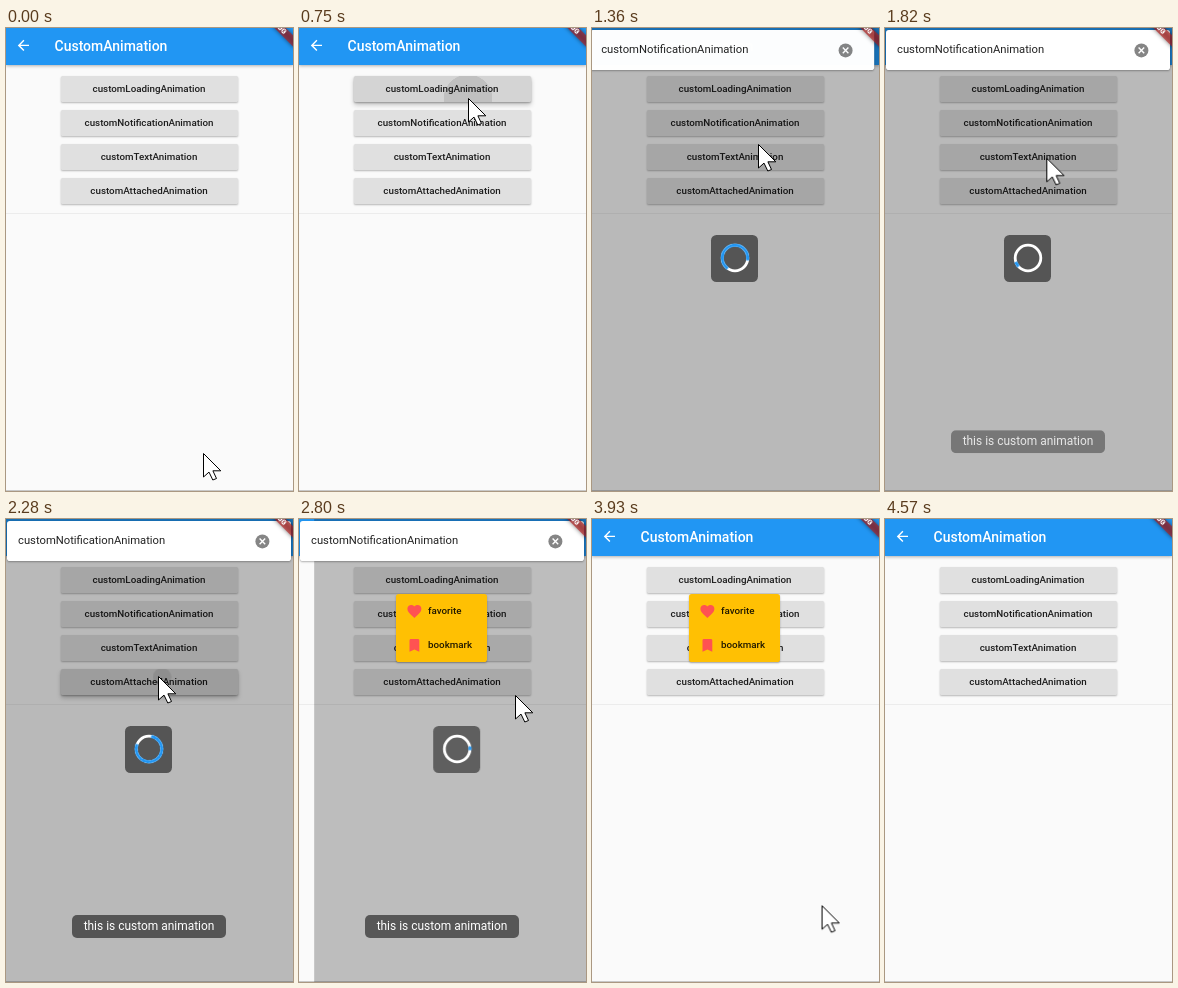
An HTML page that plays this animation: 287x463 px, repeating every 4.98 s.

```html
<!DOCTYPE html>
<html lang="en">
<head>
<meta charset="utf-8">
<title>CustomAnimation</title>
<style>
  :root { --loop: 4980ms; }
  html, body { margin: 0; width: 100%; height: 100%; overflow: hidden; }
  body { background: #fafafa; }
  #stage {
    position: relative; width: 287px; height: 463px; overflow: hidden;
    background: #fafafa; color: rgba(0, 0, 0, .87);
    font: 500 9.8px Roboto, sans-serif; white-space: nowrap;
  }
  #stage div, #stage svg, i { position: absolute; }
  svg { overflow: visible; }

  .bar {
    left: 0; top: 0; width: 287px; height: 37px; background: #2196f3;
    box-shadow: 0 1px 3px rgba(0, 0, 0, .3);
  }
  .title { left: 48.5px; top: 0; color: #fff; font-size: 14px; line-height: 36px; }
  .line { left: 0; width: 287px; height: 1px; }

  /* Buttons: highlight plus clipped splash */
  .btn {
    left: 54.5px; width: 177px; height: 26px; border-radius: 1.5px;
    background: #e0e0e0; text-align: center; line-height: 25px;
    box-shadow: 0 1px 2px rgba(0, 0, 0, .28);
  }
  .btn::before, .btn i { content: ""; position: absolute; inset: 0; border-radius: 1.5px; }
  .btn::before {
    opacity: 0; background: rgba(0, 0, 0, .05);
    box-shadow: 0 3px 5px rgba(0, 0, 0, .22);
    animation: press var(--loop) var(--at) infinite;
  }
  .btn i { overflow: hidden; }
  .btn i::after {
    content: ""; position: absolute; left: calc(var(--x) - 25px); top: calc(var(--y) - 25px);
    width: 50px; height: 50px; border-radius: 50%; opacity: 0;
    background: rgba(0, 0, 0, .09);
    animation: splash var(--loop) var(--at) linear infinite;
  }
  .btn span { position: relative; }
  @keyframes press {
    0% { opacity: 0; }
    .4%, 2.71% { opacity: 1; }
    6.7%, 100% { opacity: 0; }
  }
  @keyframes splash {
    0% { opacity: 1; transform: scale(.2); }
    2.71% { opacity: 1; transform: scale(1); }
    6.7%, 100% { opacity: 0; transform: scale(5); }
  }

  /* Toasts decelerate in, hold, and play back in reverse */
  .toast { opacity: 0; animation: show var(--loop) var(--at) infinite; }
  @keyframes show {
    0% {
      opacity: 0; transform: translate(var(--dx, 0), var(--dy, 0));
      animation-timing-function: cubic-bezier(.333, .667, .667, 1);
    }
    4.1% { opacity: 1; transform: none; }
    39.76% {
      opacity: 1; transform: none;
      animation-timing-function: cubic-bezier(.333, 0, .667, .333);
    }
    43.86%, 100% { opacity: 0; transform: translate(var(--dx, 0), var(--dy, 0)); }
  }

  .loading { --at: 774ms; --dx: 287px; inset: 0; background: rgba(0, 0, 0, .26); }
  .card {
    left: 119px; top: 207px; width: 47px; height: 46.5px;
    border-radius: 5.5px; background: rgba(0, 0, 0, .54);
  }
  .ring { left: 23.5px; top: 23.25px; width: 1px; height: 1px; }
  .ring circle { fill: none; stroke: #fff; stroke-width: 2.8; }
  .ring .arc {
    stroke: #2196f3; stroke-width: 3; stroke-linecap: square; stroke-dasharray: 0 360;
    animation: spin var(--loop) 760ms linear infinite,
               arc var(--loop) 760ms cubic-bezier(.4, 0, .2, 1) infinite;
  }
  @keyframes spin {
    from { transform: rotate(-90deg); }
    to { transform: rotate(1433.9deg); }
  }
  @keyframes arc {
    0% { stroke-dasharray: 0 360; stroke-dashoffset: 0; }
    10.04% { stroke-dasharray: 270 90; stroke-dashoffset: 0; }
    20.08% { stroke-dasharray: 0 360; stroke-dashoffset: -270; }
    30.12% { stroke-dasharray: 270 90; stroke-dashoffset: -270; }
    40.16% { stroke-dasharray: 0 360; stroke-dashoffset: -540; }
    50.2%, 100% { stroke-dasharray: 270 90; stroke-dashoffset: -540; }
  }

  .note {
    --at: 1177ms; --dx: -287px; left: 1px; top: 2px; width: 284px; height: 40px;
    border-radius: 2.8px; background: #fff; box-shadow: 0 1px 2px rgba(0, 0, 0, .3);
    font-weight: 400; font-size: 11.25px; line-height: 40px; text-indent: 11px;
  }
  .text {
    --at: 1735ms; --dy: 18.4px; left: 66px; top: 396px; width: 154px; height: 23px;
    border-radius: 5px; background: rgba(0, 0, 0, .54); color: #fff;
    font-weight: 400; font-size: 11.95px; line-height: 22px; text-align: center;
  }
  .menu {
    --at: 2310ms; left: 97px; top: 75px; width: 91px; height: 68px;
    border-radius: 2.8px; background: #ffc003; box-shadow: 0 1px 2px rgba(0, 0, 0, .3);
  }
  .menu svg { left: 9.5px; }
  .menu div { left: 32px; line-height: 14px; }

  .banner {
    left: 242.7px; top: -6.6px; width: 56px; height: 8.4px; transform: rotate(45deg);
    color: #fff; font-size: 7.1px; font-weight: 900; line-height: 8.4px; text-align: center;
  }
  .banner::before, .banner::after { content: ""; position: absolute; inset: 0; }
  .banner::before { background: rgba(0, 0, 0, .5); filter: blur(2px); }
  .banner::after { background: rgba(183, 28, 28, .63); }
  .banner span { position: relative; z-index: 1; }

  .cursor { left: 0; top: 0; width: 20px; height: 28px; animation: move var(--loop) ease-in-out infinite; }
  @keyframes move {
    0% { transform: translate(197px, 425px); }
    10.4%, 16.5% { transform: translate(169px, 70px); }
    20.1%, 23.1% { transform: translate(167px, 95px); }
    26.9%, 32.1% { transform: translate(166px, 116px); }
    43.2%, 48.2% { transform: translate(152px, 157px); }
    54.6% { transform: translate(216px, 176px); }
    68.3% { transform: translate(216px, 176px); animation-timing-function: linear; }
    73.3% { transform: translate(222px, 270px); animation-timing-function: linear; }
    83%, 100% { transform: translate(235px, 470px); }
  }
</style>
</head>
<body>
<div id="stage">
  <div class="bar">
    <svg style="left:9.2px;top:8.8px" width="16.8" height="16.8" viewBox="0 0 24 24" fill="#fff">
      <path d="M20 11H7.83l5.59-5.59L12 4l-8 8 8 8 1.41-1.41L7.83 13H20z"/>
    </svg>
    <div class="title">CustomAnimation</div>
  </div>

  <div class="btn" style="top:48px;--at:620ms;--x:114px;--y:23px"><i></i><span>customLoadingAnimation</span></div>
  <div class="btn" style="top:82px;--at:1030ms;--x:114px;--y:13px"><i></i><span>customNotificationAnimation</span></div>
  <div class="btn" style="top:116px;--at:1380ms;--x:113px;--y:2px"><i></i><span>customTextAnimation</span></div>
  <div class="btn" style="top:150px;--at:2252ms;--x:101px;--y:8px"><i></i><span>customAttachedAnimation</span></div>
  <div class="line" style="top:185px;background:#ececec"></div>
  <div class="line" style="top:462px;background:#c8c8c8"></div>

  <div class="loading toast">
    <div class="card">
      <svg class="ring">
        <circle r="12.8"/>
        <circle class="arc" r="12.8" pathLength="360"/>
      </svg>
    </div>
  </div>

  <div class="note toast">customNotificationAnimation
    <svg style="left:247.1px;top:11.7px" width="16.8" height="16.8" viewBox="0 0 24 24">
      <circle cx="12" cy="12" r="10" fill="#858585"/>
      <path d="M8 8l8 8M16 8l-8 8" stroke="#fff" stroke-width="2"/>
    </svg>
  </div>

  <div class="text toast">this is custom animation</div>

  <div class="menu toast">
    <svg style="top:8.7px" width="16.8" height="16.8" viewBox="0 0 24 24" fill="#ff5252">
      <path d="M12 21.35l-1.45-1.32C5.4 15.36 2 12.28 2 8.5 2 5.42 4.42 3 7.5 3c1.74 0 3.41.81 4.5 2.09C13.09 3.81 14.76 3 16.5 3 19.58 3 22 5.42 22 8.5c0 3.78-3.4 6.86-8.55 11.54z"/>
    </svg>
    <svg style="top:42.7px" width="16.8" height="16.8" viewBox="0 0 24 24" fill="#ff5252">
      <path d="M17 3H7c-1.1 0-2 .9-2 2v16l7-3 7 3V5c0-1.1-.9-2-2-2z"/>
    </svg>
    <div style="top:10px">favorite</div>
    <div style="top:44px">bookmark</div>
  </div>

  <div class="banner"><span>DEBUG</span></div>

  <svg class="cursor">
    <path d="M.5 .5V24L6 19.1 9.8 27 13.5 25.5 9.9 17.8H17.8Z" fill="#fff" stroke="#000"/>
  </svg>
</div>
</body>
</html>
```
